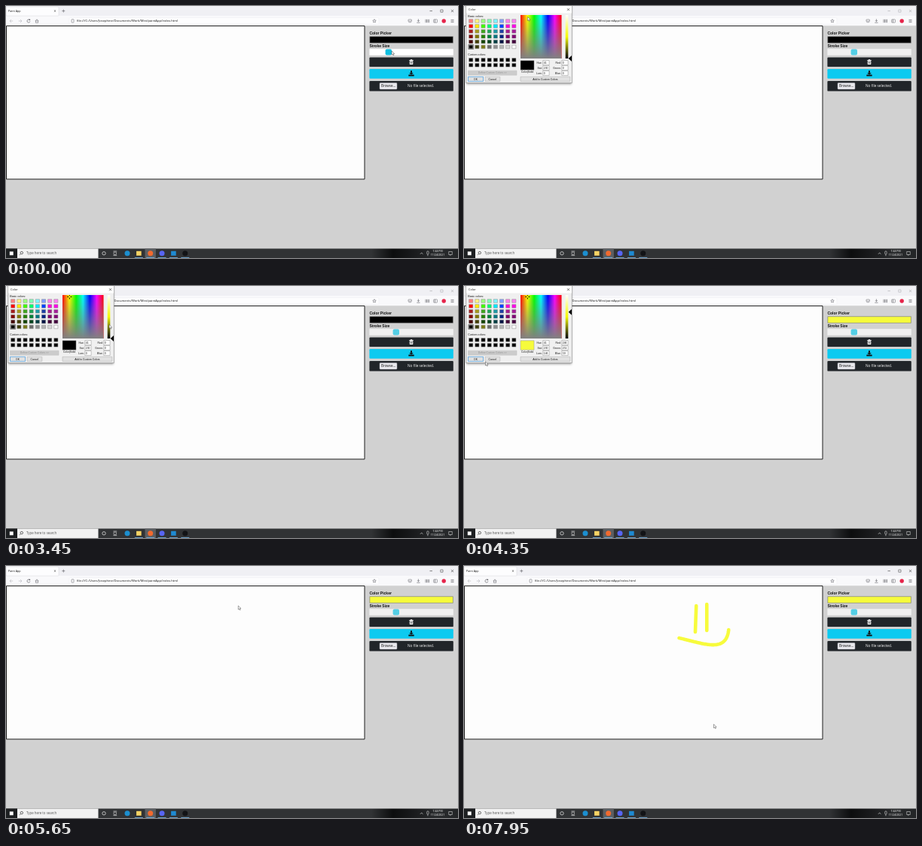
These frames come from a looping animation (600x336 px, 8 s). An HTML page with a canvas:

```html
<!DOCTYPE html>
<html lang="en">
<head>
<meta charset="utf-8">
<title>Paint App</title>
<style>
html, body { margin: 0; width: 600px; height: 336px; overflow: hidden; }
canvas { display: block; }
</style>
</head>
<body>
<canvas id="stage" width="600" height="336"></canvas>
<script>
const g = document.getElementById('stage').getContext('2d');
const LOOP = 8000, STEP = 50;
const UI = '"Open Sans", "Noto Sans", sans-serif';
const ARIAL = '"Liberation Sans", Arial, sans-serif';

// Each pointer move: start, duration, end point; bend holds curve controls
const home = [512, 60];
const sliderDrag = { at: 0, ms: 250, to: [522, 60] };
const hueDrag = { at: 1650, ms: 400, to: [84.4, 14.5] };
const lumDrag = { at: 3500, ms: 350, to: [137, 34.7] };
const moves = [
  sliderDrag,
  { at: 300, ms: 250, to: [540, 44] },
  { at: 750, ms: 350, to: [163.5, 50] },
  { at: 1150, ms: 500, to: [97, 22] },
  hueDrag,
  { at: 2650, ms: 750, to: [137, 51.5] },
  lumDrag,
  { at: 4000, ms: 350, to: [28.5, 101] },
  { at: 4350, ms: 150, to: [17, 97] },
  { at: 4650, ms: 1000, to: [308.3, 53] },
  { at: 5700, ms: 300, to: [307, 88], draw: true },
  { at: 6000, ms: 200, to: [322.3, 51] },
  { at: 6200, ms: 250, to: [322.3, 86], draw: true },
  { at: 6450, ms: 400, to: [285.5, 96] },
  { at: 6850, ms: 650, to: [351.3, 85], draw: true, bend: [[320, 104], [348, 116]] },
  { at: 7500, ms: 400, to: [331.5, 211] }
];
const OPEN = 800, CLOSE = 4600;
const field = { x: 75, y: 12, w: 54.5, h: 58 };

const clamp = (v, a, b) => Math.min(b, Math.max(a, v));
const end = move => move.at + move.ms;

// Without a bend the doubled end points make the cubic ease in and out
function pointer(t) {
  let pos = home;
  for (const { at, ms, to, bend } of moves) {
    if (t < at) break;
    const k = Math.min(1, (t - at) / ms), j = 1 - k, from = pos;
    const [b, c] = bend || [from, to];
    pos = from.map((a, i) =>
      j * j * j * a + 3 * j * j * k * b[i] + 3 * j * k * k * c[i] + k * k * k * to[i]);
  }
  return pos;
}

// Hue, saturation and luminance run from 0 to 240
function toRgb(h, s, l) {
  s /= 240; l /= 240;
  const a = s * Math.min(l, 1 - l);
  return [0, 8, 4].map(n => {
    const k = (n + h / 20) % 12;
    return Math.round(255 * (l - a * clamp(Math.min(k - 3, 9 - k), -1, 1)));
  });
}

function pickedColor(t) {
  const c = { h: 160, s: 0, l: 0 };
  const level = y => Math.round(240 * (1 - (y - field.y) / field.h));
  if (t >= hueDrag.at) {
    const [x, y] = pointer(Math.min(t, end(hueDrag)));
    c.h = Math.round((x - field.x) / field.w * 240);
    c.s = level(y);
  }
  if (t >= lumDrag.at) c.l = level(pointer(Math.min(t, end(lumDrag)))[1]);
  c.rgb = toRgb(c.h, c.s, c.l);
  return c;
}

function paint(fill, edge, lw = 0.5) {
  if (fill) { g.fillStyle = fill; g.fill(); }
  if (edge) { g.strokeStyle = edge; g.lineWidth = lw; g.stroke(); }
}

function box(x, y, w, h, fill, edge, r = 0, lw) {
  g.beginPath();
  g.roundRect(x, y, w, h, r);
  paint(fill, edge, lw);
}

function dot(x, y, r, fill, edge) {
  g.beginPath();
  g.arc(x, y, r, 0, 7);
  paint(fill, edge, 0.7);
}

function shape(points, fill, edge, lw) {
  g.beginPath();
  points.forEach(p => g.lineTo(...p));
  g.closePath();
  paint(fill, edge, lw);
}

function line(points, color, lw = 0.6) {
  g.beginPath();
  points.forEach(p => g.lineTo(...p));
  paint(null, color, lw);
}

function text(s, x, y, size, color = '#111', font = UI, align = 'left', weight = '') {
  g.font = `${weight} ${size}px ${font}`;
  g.textAlign = align;
  g.textBaseline = 'middle';
  g.fillStyle = color;
  g.fillText(s, x, y);
}

const across = (x, y, r, color) => line([[x - r, y], [x + r, y]], color);
const upright = (x, y, r, color) => line([[x, y - r], [x, y + r]], color);

function cross(x, y, r, color) {
  line([[x - r, y - r], [x + r, y + r]], color);
  line([[x + r, y - r], [x - r, y + r]], color);
}

function chevron(x, y, dx, dy, color) {
  line([[x - dx - dy, y - dy - dx], [x, y], [x - dx + dy, y - dy + dx]], color);
}

function gradient(x0, y0, x1, y1, ...stops) {
  const gr = g.createLinearGradient(x0, y0, x1, y1);
  stops.forEach((c, i) => gr.addColorStop(i / (stops.length - 1), c));
  return gr;
}

function browser(active) {
  const ink = '#55555c', pale = '#b4b4ba', win = active ? '#333' : '#a5a5a8';
  box(0, 0, 600, 14, '#f0f0f4');
  box(0, 13, 600, 13.3, '#f9f9fb');
  box(0, 1, 70, 12.2, '#fdfdfe', '#d5d5da', 1);
  text('Paint App', 3, 6.8, 3.7);
  cross(65, 6.6, 1.1, '#444');
  across(76.3, 6.6, 2, ink);
  upright(76.3, 6.6, 2, ink);
  across(564.2, 6.6, 1.7, win);
  box(576.8, 5, 3.2, 3.2, null, win);
  cross(592.5, 6.6, 1.6, win);

  across(7.2, 20, 2, pale);
  chevron(5, 20, -2, 0, pale);
  across(18.8, 20, 2, pale);
  chevron(21, 20, 2, 0, pale);
  g.beginPath();
  g.arc(30, 20, 2, 0.2, 5.4);
  paint(null, ink, 0.6);
  box(30.6, 17.6, 1.5, 1.5, ink);
  chevron(41, 17.8, 0, -2.2, ink);
  box(39.4, 20, 3.2, 2.3, null, ink);

  box(84, 15.6, 411, 8.8, '#fdfdfe', '#ececf0', 1.2);
  box(87, 17.8, 3, 4.2, null, ink, 0.5);
  text('file:///C:/Users/Josephine/Documents/Work/Mini/paintApp/index.html', 94, 20, 4.14);
  const star = Array.from({ length: 10 }, (_, i) => {
    const a = i * Math.PI / 5 - Math.PI / 2, r = i % 2 ? 1.1 : 2.4;
    return [489 + r * Math.cos(a), 20 + r * Math.sin(a)];
  });
  shape(star, null, ink);
  box(534, 18, 4.4, 3.8, null, ink, [0.5, 0.5, 2, 2]);
  chevron(536.2, 20.6, 0, 1.2, ink);
  upright(547.4, 19, 1.6, ink);
  chevron(547.4, 20.6, 0, 1.4, ink);
  across(547.4, 22.2, 2.1, ink);
  for (let x = 557; x < 562; x += 1.5) upright(x, 20, 2.2, ink);
  box(567.6, 17.9, 4.8, 4.2, null, ink, 0.6);
  upright(569.4, 20, 2, ink);
  dot(581.2, 20, 2.7, '#e6244a');
  for (let y = 18.4; y < 22; y += 1.6) across(592.5, y, 2, ink);
}

function drawing(t) {
  box(0.5, 26.6, 475.5, 204.3, '#fdfdfd', '#1c1c1c', 0, 1);
  g.lineCap = g.lineJoin = 'round';
  for (const move of moves) {
    if (!move.draw || t < move.at) continue;
    const points = [];
    for (let s = move.at; s <= Math.min(t, end(move)); s += 10) points.push(pointer(s));
    line(points, '#f7fb3c', 4.6);
  }
  g.lineCap = 'butt';
  g.lineJoin = 'miter';
}

function panel(t, color) {
  const x = 482.4, w = 111.4, mid = 538, dark = '#212529';
  text('Color Picker', x, 36.4, 5, '#111', ARIAL, 'left', 'bold');
  box(x + 0.4, 40.7, w - 0.8, 8.6, `rgb(${color.rgb})`, '#858585', 0, 0.7);
  text('Stroke Size', x, 53.9, 5, '#111', ARIAL, 'left', 'bold');

  const sliding = end(sliderDrag);
  g.globalAlpha = t <= sliding + 100 ? 1 : 0.7;
  box(x, 57.2, w, 8.6, '#fff');
  box(pointer(Math.min(t, sliding))[0] - 8.4, 57.4, 8.4, 8.2, '#10bfe0', null, 2);
  g.globalAlpha = 1;

  box(x, 68.4, w, 12.7, dark, null, 1.2);
  box(mid - 2.8, 72, 5.6, 0.9, '#fff');
  box(mid - 1.2, 71.2, 2.4, 0.9, '#fff');
  box(mid - 2.3, 73.3, 4.6, 4.6, '#fff', null, 0.6);
  for (const dx of [-1, 0, 1]) upright(mid + dx, 75.6, 1.3, dark);

  box(x, 84.1, w, 12.7, '#0dcaf0', null, 1.2);
  box(mid - 3.7, 91.4, 7.4, 2.2, '#111', null, 0.5);
  box(mid - 1, 86.3, 2, 3, '#111');
  shape([[mid - 2.9, 88.9], [mid + 2.9, 88.9], [mid, 91.9]], '#111', '#0dcaf0', 0.3);

  box(x, 99.9, w, 13.7, dark, null, 1.2);
  box(496, 102.5, 23, 8.5, '#e9e9ed', '#a0a0aa', 1);
  text('Browse...', 507.5, 106.8, 4.5, '#111', UI, 'center');
  text('No file selected.', 533, 106.8, 4.75, '#f4f4f4');
}

function taskbar() {
  const top = 323.5, mid = 329.8, white = '#f2f2f2';
  box(0, top, 485, 12.5, '#313335');
  box(485, top, 115, 12.5, gradient(485, 0, 600, 0,
    '#313335', '#0c0d0e', '#1a1b1d', '#2a2c2e', '#232527'));
  box(0, top, 15, 12.5, '#1d1f21');
  box(4.8, 327.4, 4.9, 4.9, '#fff');
  box(15, top, 107.5, 12.5, white);
  dot(20.8, 329.1, 1.7, null, '#333');
  line([[19.6, 330.4], [18, 332.1]], '#333');
  text('Type here to search', 27, mid, 4.4, '#555');
  dot(130, mid, 2.2, null, white);
  box(143, 328.2, 3.4, 3.2, null, white);
  for (const dy of [-2.8, 2.8]) across(144.8, mid + dy, 2.4, white);

  const apps = ['#1c8fd0', '#f7d465', '#f26a2e', '#5865f2', '#1f8ad2', '#121316'];
  apps.forEach((color, i) => {
    const x = 161 + i * 15.35, focused = i === 2;
    if (focused) box(x - 7.2, top, 14.4, 12.5, '#5c5f62');
    if (i === 1 || i === 4) box(x - 3.3, mid - 3, 6.6, 6, color);
    else dot(x, mid, 3.5, color);
    if (i) box(x - 5.5, 335.2, 11, 0.8, '#76b9ed');
  });

  chevron(551.7, 329, 0, -1.8, white);
  box(558.7, 326.8, 2.4, 4.4, null, white, 1.2);
  upright(559.9, 332.3, 0.9, white);
  text('7:44 PM', 573, 326.9, 3.5, '#fff', UI, 'center');
  text('11/24/2021', 573, 332.5, 3.5, '#fff', UI, 'center');
  box(587.7, 327.5, 4.6, 4, null, white);
  upright(589.8, 332.2, 0.7, white);
}

function swatch(i, y, color) {
  box(6.6 + i % 8 * 8.16, y + Math.floor(i / 8) * 6.9, 5.2, 4.6, color, '#8a8a8a');
}

// Rows darken downwards; the last one runs from black to white
function basicColor(i) {
  const col = i % 8, row = Math.floor(i / 8);
  if (row === 5) return `hsl(60 ${col < 3 ? 70 : 0}% ${col * 14}%)`;
  const hue = [0, 55, 105, 145, 185, 225, 310, 305][col];
  return `hsl(${hue} ${row === 2 ? 70 : 100}% ${[75, 50, 38, 25, 13][row]}%)`;
}

function button(label, x, y, w, edge = '#adadad', ink = '#111', fill = '#e1e1e1') {
  box(x, y, w, 6, fill, edge);
  text(label, x + w / 2, y + 3.2, 3.4, ink, ARIAL, 'center');
}

function dialog(t, c) {
  const { x, y, w, h } = field;
  g.save();
  g.globalAlpha = clamp((t - OPEN + 100) / 200, 0, 1);
  g.shadowColor = 'rgba(0,0,0,.45)';
  g.shadowBlur = 3;
  g.shadowOffsetY = 1;
  box(2.7, -2, 140.6, 104.6, '#f0f0f0');
  g.shadowColor = 'transparent';
  box(2.7, -2, 140.6, 104.6, null, '#777');
  box(3, 0, 140, 9.6, '#fff');
  text('Color', 6, 4.8, 3.8);
  cross(138.5, 4.7, 1.5, '#222');

  text('Basic colors:', 5.2, 14, 3.7, '#111', ARIAL);
  for (let i = 0; i < 48; i++) swatch(i, 17.7, basicColor(i));
  box(5.8, 51.5, 6.8, 6, null, '#222');
  text('Custom colors:', 5.2, 65.2, 3.6, '#111', ARIAL);
  for (let i = 0; i < 16; i++) swatch(i, 69.6, '#000');
  button('Define Custom Colors >>', 5.5, 86.2, 64.5, '#bfbfbf', '#8f8f8f', '#ccc');
  button('OK', 5.5, 94.4, 20, '#0078d7');
  button('Cancel', 28, 94.4, 19.8);
  button('Add to Custom Colors', 75, 94.4, 65.8);

  box(x, y, w, h, gradient(x, 0, x + w, 0,
    '#f00', '#ff0', '#0f0', '#0ff', '#00f', '#f0f', '#f00'));
  box(x, y, w, h, gradient(0, y, 0, y + h, 'rgba(128,128,128,0)', 'rgb(128,128,128)'));
  if (t < hueDrag.at || t > end(hueDrag)) {
    g.save();
    g.beginPath();
    g.rect(x, y, w, h);
    g.clip();
    const cx = x + c.h / 240 * w, cy = y + (1 - c.s / 240) * h;
    for (const [dx, dy] of [[1, 0], [-1, 0], [0, 1], [0, -1]])
      line([[cx + dx * 1.2, cy + dy * 1.2], [cx + dx * 3, cy + dy * 3]], '#000', 1);
    g.restore();
  }

  const pure = `rgb(${toRgb(c.h, c.s, 120)})`;
  box(134.7, y, 3.6, h, gradient(0, y, 0, y + h, '#fff', pure, '#000'));
  const ay = y + (1 - c.l / 240) * h;
  shape([[138.7, ay], [143, ay - 4], [143, ay + 4]], '#000');

  box(75, 72.8, 18, 12.4, `rgb(${c.rgb})`, '#999');
  text('Color|Solid', 84, 88, 3.3, '#111', ARIAL, 'center');
  const rows = [['Hue:', c.h, 'Red:'], ['Sat:', c.s, 'Green:'], ['Lum:', c.l, 'Blue:']];
  rows.forEach(([left, value, right], i) => {
    const ry = 75.6 + i * 7;
    [[left, value, 104.8], [right, c.rgb[i], 129.8]].forEach(([label, n, bx]) => {
      text(label, bx - 1.2, ry, 3.4, '#111', ARIAL, 'right');
      box(bx, ry - 3, 8.3, 6, '#fff', '#8a8a8a');
      text(n, bx + 1, ry + 0.1, 3.4, '#111', ARIAL);
    });
  });
  g.restore();
}

function arrow([x, y]) {
  const outline = [[0, 0], [0, 5], [1.2, 4], [2, 5.8], [2.9, 5.4], [2.1, 3.7], [3.7, 3.6]];
  shape(outline.map(([dx, dy]) => [x + dx, y + dy]), '#fff', '#444', 0.5);
}

function render(t) {
  const color = pickedColor(t), open = t >= OPEN && t < CLOSE;
  box(0, 0, 600, 336, '#d1d1d1');
  browser(!open);
  drawing(t);
  panel(t, color);
  taskbar();
  if (open) dialog(t, color);
  arrow(pointer(t));
}

const start = performance.now();
function tick() {
  const t = (performance.now() - start) % LOOP;
  render(Math.floor(t / STEP) * STEP);
  requestAnimationFrame(tick);
}
tick();
</script>
</body>
</html>
```
